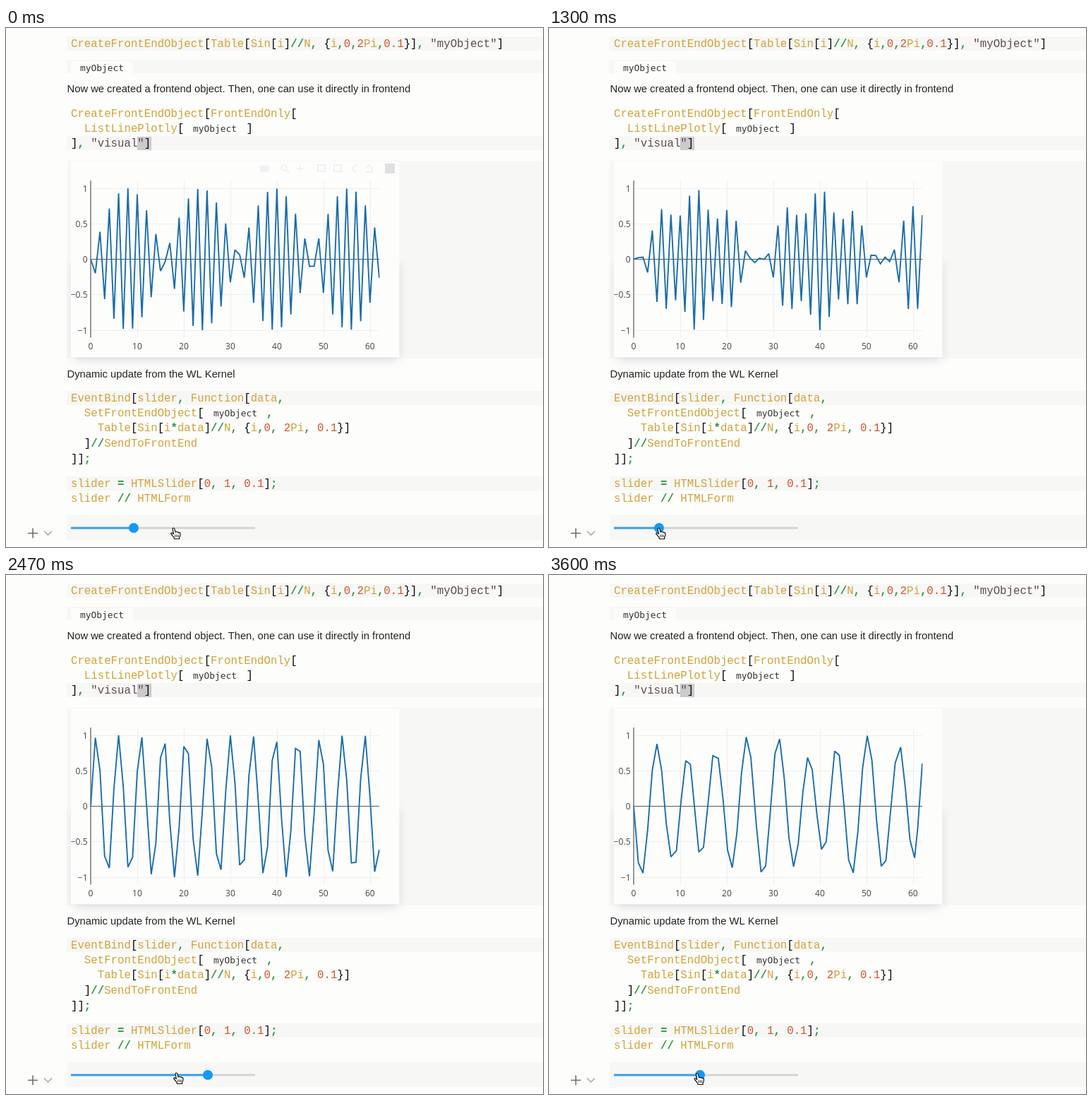
Write an HTML page with a canvas that moves like this. It is 761 by 735 pixels and loops after 3.63 s.

```html
<!DOCTYPE html>
<html lang="en">
<head>
<meta charset="utf-8">
<title>Dynamic plot notebook</title>
<style>
  html, body { margin: 0; width: 100%; height: 100%; overflow: hidden; background: #fdfdfc; }
  canvas { display: block; }
</style>
</head>
<body>
<canvas id="stage" width="761" height="735"></canvas>
<script>
const ctx = document.getElementById('stage').getContext('2d');
const LOOP = 3630;
const PAPER = '#fdfdfc', BAND = '#f7f7f6';
const MONO = '15.73px "Liberation Mono", monospace';
const SANS = '14.78px "Liberation Sans", sans-serif';
const CHIP = '12.9px "DejaVu Sans Mono", monospace';
const TICK = '12px "Open Sans", sans-serif';

// Plot geometry
const X0 = 120, Y0 = 327.5, XS = 6.597, YS = 100.5, TOP = 216, BOTTOM = 438.5;
const px = k => X0 + XS * k;
const py = v => Y0 - YS * v;

// [start time, slider value]: each entry morphs the previous curve into sin(0.1 * value * k)
const MORPH = 300;
const updates = [[0, 33.4], [150, 56.2], [800, 32.6], [1197, 23.2],
  [2130, 75.9], [2842, 57.9], [3125, 55.8], [3407, 53.1]];

// [time, x, y]; a repeated time is a jump
const pointerKeys = [[0, 240, 708], [110, 240, 708], [430, 184, 708], [660, 183, 708], [1050, 158, 708],
  [1400, 158, 708], [1850, 289, 707], [2140, 289, 707], [2440, 244, 705], [2660, 244, 705],
  [2900, 214, 706], [3200, 212.5, 706], [LOOP, 212.5, 706]];
const thumbKeys = [[0, 181], [100, 181], [100, 237.5], [640, 237.5], [640, 181], [750, 179], [1050, 156],
  [2090, 156], [2090, 286], [2660, 286], [2660, 241.5], [2900, 214], [LOOP, 214]];

const lerp = (a, b, t) => a + (b - a) * t;
const clamp = t => Math.max(0, Math.min(1, t));
const cubicInOut = t => t < 0.5 ? 4 * t ** 3 : 1 - 4 * (1 - t) ** 3;
const smooth = t => t * t * (3 - 2 * t);

function sample(keys, t) {
  let i = keys.length - 2;
  while (i > 0 && keys[i][0] > t) i--;
  const a = keys[i], b = keys[i + 1];
  const s = smooth(clamp((t - a[0]) / (b[0] - a[0] || 1)));
  return a.slice(1).map((v, n) => lerp(v, b[n + 1], s));
}

// Merges runs of nearly collinear points, as the chart does
function simplify(points) {
  const out = [points[0]];
  let start = points[0], i = 1;
  while (i < points.length) {
    let end = points[i++];
    const dx = end[0] - start[0], dy = end[1] - start[1], len = Math.hypot(dx, dy);
    let low = 0, high = 0;
    while (i < points.length) {
      const p = points[i];
      const off = ((p[0] - start[0]) * dy - (p[1] - start[1]) * dx) / len;
      low = Math.min(low, off);
      high = Math.max(high, off);
      if (high - low > 0.75) break;
      end = p;
      i++;
    }
    out.push(end);
    if (i < points.length) out.push(start = points[i++]);
  }
  return out;
}

const curves = updates.map(([, value]) =>
  simplify(Array.from({ length: 63 }, (_, k) => [px(k), py(Math.sin(0.1 * value * k))])));

// Points are matched by index, so merged points shift the blend sideways
function curveAt(t) {
  let i = updates.length - 1;
  while (i > 0 && updates[i][0] > t) i--;
  if (i === 0) return curves[0];
  const s = cubicInOut(clamp((t - updates[i][0]) / MORPH));
  const from = curves[i - 1];
  return curves[i].map((p, j) => from[j] ? [lerp(from[j][0], p[0], s), lerp(from[j][1], p[1], s)] : p);
}

function rect(x, y, w, h, color) {
  ctx.fillStyle = color;
  ctx.fillRect(x, y, w, h);
}

function line(points, color, width) {
  ctx.beginPath();
  points.forEach(([x, y]) => ctx.lineTo(x, y));
  ctx.strokeStyle = color;
  ctx.lineWidth = width;
  ctx.stroke();
}

function text(str, x, y, font, color, align = 'left') {
  ctx.font = font;
  ctx.fillStyle = color;
  ctx.textAlign = align;
  ctx.fillText(str, x, y);
}

const tokenStyles = [
  [/^"[^"]*"/, '#5f4c4c'],
  [/^[\[\]{}]/, '#080808'],
  [/^[\d.]+/, '#d0552c'],
  [/^[A-Za-z]+/, '#cfa339'],
  [/^[^\w"\[\]{}]/, '#2f9440', 'bold ']
];

function code(str, y, x = 92) {
  while (str) {
    const [pattern, color, weight = ''] = tokenStyles.find(([re]) => re.test(str));
    const token = str.match(pattern)[0];
    text(token, x, y, weight + MONO, color);
    x += ctx.measureText(token).width;
    str = str.slice(token.length);
  }
}

function chip(x, y, w, h, textX, baseline) {
  ctx.fillStyle = PAPER;
  ctx.beginPath();
  ctx.roundRect(x, y, w, h, 4);
  ctx.fill();
  text('myObject', textX, baseline, CHIP, '#333');
}

function drawNotebook() {
  rect(0, 0, 761, 735, PAPER);
  for (const [y, h] of [[12, 20], [45, 19], [153, 20], [188, 280], [514, 20], [635, 20], [690, 35]])
    rect(86, y, 675, h, BAND);

  code('CreateFrontEndObject[Table[Sin[i]//N, {i,0,2Pi,0.1}], "myObject"]', 27);
  chip(92, 47, 88, 19, 105, 61);
  text('Now we created a frontend object. Then, one can use it directly in frontend', 86.5, 91, SANS, '#222');

  code('CreateFrontEndObject[FrontEndOnly[', 126);
  code('  ListLinePlotly[', 147);
  chip(254, 133, 84, 19, 265, 147);
  code(']', 147, 340.5);
  rect(186, 154, 20, 19, '#cbcacd');
  code('], "visual"]', 168);

  text('Dynamic update from the WL Kernel', 86.5, 495, SANS, '#222');
  code('EventBind[slider, Function[data,', 529);
  code('  SetFrontEndObject[', 550);
  chip(283, 536, 84, 19, 294, 550);
  code(',', 550, 369);
  code('    Table[Sin[i*data]//N, {i,0, 2Pi, 0.1}]', 571);
  code('  ]//SendToFrontEnd', 593);
  code(']];', 615);
  code('slider = HTMLSlider[0, 1, 0.1];', 650);
  code('slider // HTMLForm', 671);

  line([[31, 715.5], [45, 715.5]], '#707070', 1.6);
  line([[38, 708.5], [38, 722.5]], '#707070', 1.6);
  line([[54, 712.5], [59.5, 718], [65, 712.5]], '#aaa', 1.6);
}

function drawCard() {
  ctx.save();
  ctx.shadowColor = 'rgba(60,60,80,.2)';
  ctx.shadowBlur = 14;
  ctx.shadowOffsetY = 4;
  rect(97, 330, 458, 135, PAPER);
  ctx.restore();
  rect(92, 189, 465.5, 277.5, PAPER);
}

// Fading chart toolbar
function drawToolbar(alpha) {
  if (alpha <= 0) return;
  ctx.save();
  ctx.globalAlpha = alpha;
  const c = '#f1f1f5';
  rect(360, 195, 13, 9, c);
  ctx.beginPath();
  ctx.arc(394, 198, 4, 0, 7);
  ctx.strokeStyle = c;
  ctx.lineWidth = 2;
  ctx.stroke();
  line([[397, 201], [401, 205]], c, 2);
  line([[412, 199], [422, 199]], c, 2);
  line([[417, 194], [417, 204]], c, 2);
  for (const x of [442, 465]) {
    ctx.lineWidth = 2;
    ctx.strokeRect(x, 194, 10, 9);
  }
  line([[497, 193], [490, 199], [497, 205]], c, 2);
  line([[509, 199], [514, 194], [519, 199], [519, 204], [510, 204]], c, 2);
  rect(537, 192, 14, 14, '#dfdfe4');
  ctx.restore();
}

function drawChart(t) {
  drawCard();
  drawToolbar(1 - t / 220);
  for (let k = 10; k <= 60; k += 10)
    line([[Math.round(px(k)) + 0.5, TOP], [Math.round(px(k)) + 0.5, BOTTOM]], '#eeeef1', 1);
  for (const v of [1, 0.5, -0.5, -1]) {
    const y = Math.floor(py(v)) + 0.5;
    line([[X0, y], [529, y]], '#eeeef1', 1);
  }
  line([[X0, Y0], [529, Y0]], '#555c60', 1.2);
  line([[X0, TOP], [X0, BOTTOM]], '#555', 1.2);

  ctx.save();
  ctx.beginPath();
  ctx.rect(X0 - 0.5, TOP, 410, BOTTOM - TOP);
  ctx.clip();
  ctx.lineJoin = 'miter';
  ctx.miterLimit = 2;
  line(curveAt(t), '#1b6da8', 1.9);
  ctx.restore();

  for (let k = 0; k <= 60; k += 10) text(String(k), px(k), 455, TICK, '#444', 'center');
  for (const v of [1, 0.5, 0, -0.5, -1])
    text(String(v).replace('-', '−'), 115.5, py(v) + 4.5, TICK, '#444', 'right');
}

function drawSlider(t) {
  const [x] = sample(thumbKeys, t);
  rect(92, 706.7, 261, 2.8, '#d4d3d2');
  rect(92, 706.7, x - 92, 2.8, '#319fea');
  ctx.fillStyle = '#1499f2';
  ctx.beginPath();
  ctx.arc(x, 708, 7, 0, 7);
  ctx.fill();
}

// Blinks every 600 ms; moves to the upper line on the last press
function drawCaret(t) {
  if (t >= 300 && Math.floor((t - 300) / 600) % 2 === 0)
    rect(91.3, t < 2690 ? 709 : 691, 1.2, 15.5, '#111');
}

const hand = new Path2D('M-4 1.2 C-4-.4-1.6-.4-1.2 1.2 L.1 6 C.6 5 2.4 5 2.7 6.2 C3.3 5.5 4.8 5.7 5 6.9' +
  ' C5.8 6.4 7 6.9 7 8.2 C7.2 10.5 6.5 12 5.6 13.3 L5.6 15.5 L-1.6 15.5 L-1.9 13.5 C-3.2 12-4.5 10-6 8.7' +
  ' C-7 7.5-5.6 6.4-4.4 7.2 L-2.6 8.6 Z');
const fingers = new Path2D('M-.2 9.5 V13 M2 9.5 V13 M4.1 9.5 V13');

function drawPointer(t) {
  const [x, y] = sample(pointerKeys, t);
  ctx.save();
  ctx.translate(x, y);
  ctx.lineJoin = 'round';
  ctx.fillStyle = '#fff';
  ctx.strokeStyle = '#111';
  ctx.lineWidth = 1.2;
  ctx.fill(hand);
  ctx.stroke(hand);
  ctx.lineWidth = 0.9;
  ctx.stroke(fingers);
  ctx.restore();
}

const begin = performance.now();

function frame() {
  const t = (performance.now() - begin) % LOOP;
  drawNotebook();
  drawChart(t);
  drawSlider(t);
  drawCaret(t);
  drawPointer(t);
  requestAnimationFrame(frame);
}
frame();
</script>
</body>
</html>
```
